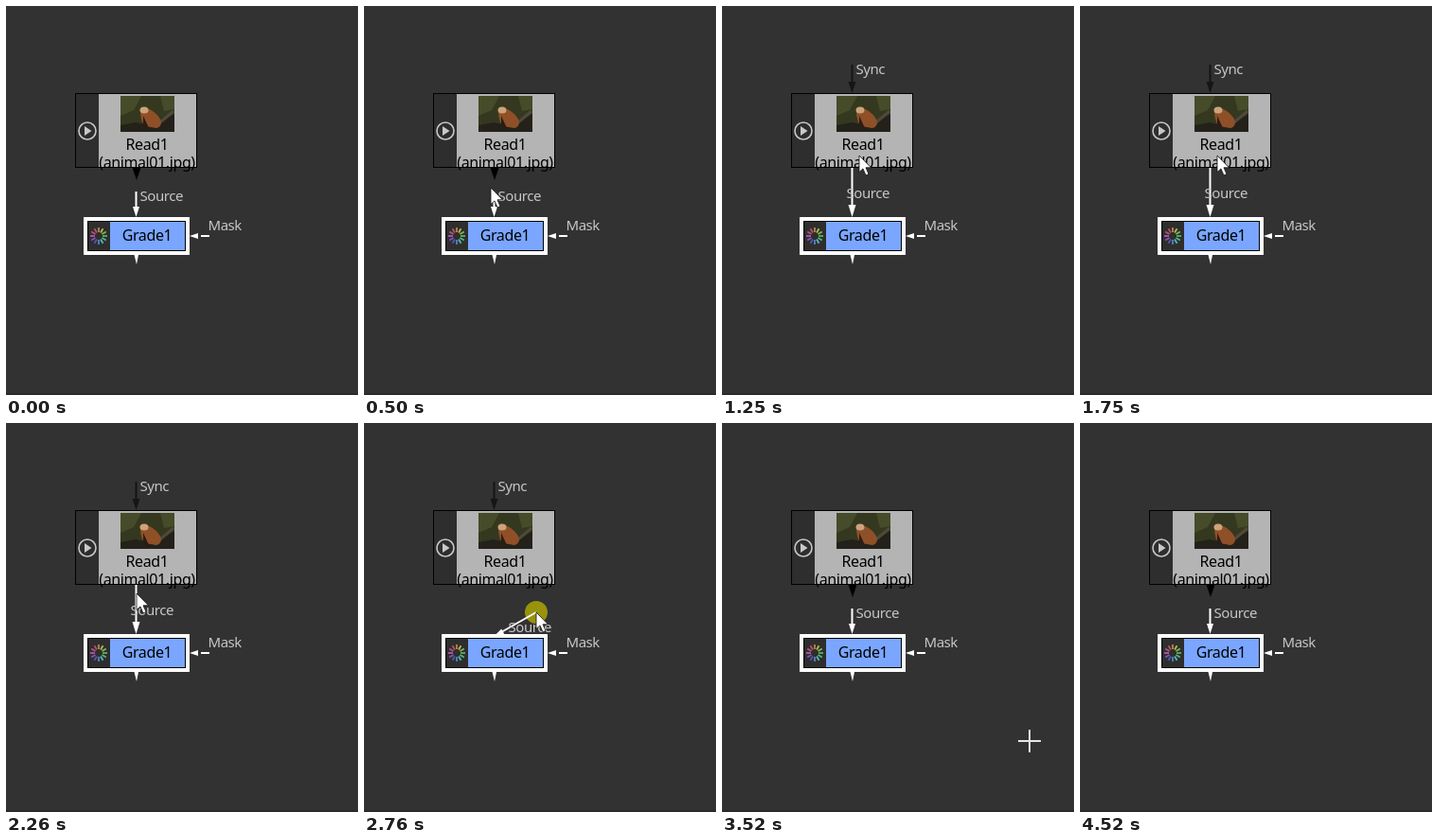
Animation of 372 by 411 pixels, one loop 4770 ms. Source, as an HTML page:

```html
<!DOCTYPE html>
<html lang="en">
<head>
<meta charset="utf-8">
<title>Node graph</title>
<style>
  html, body { margin: 0; width: 100%; height: 100%; overflow: hidden; background: #323232; }
  svg { display: block; width: 372px; height: 411px; font-family: "Noto Sans", "Open Sans", sans-serif; }
  .label { font-size: 15px; letter-spacing: -.45px; fill: #c6c6c6; }
  .title { font-size: 16px; letter-spacing: -.4px; fill: #000; }
  .wire { stroke: #fff; stroke-width: 2; }
  .white { fill: #fff; }

  .anim { animation: 4770ms step-end infinite; }
  #loose { animation-name: loose; }
  #output { animation-name: output; }
  #linked { animation-name: linked; }
  #sync { animation-name: sync; }
  #dragA { animation-name: dragA; }
  #dragB { animation-name: dragB; }
  #dragC { animation-name: dragC; }
  #arrow { animation-name: arrow; }
  #cross { animation-name: cross; }

  @keyframes loose { 0%, 63.1% { opacity: 1; } 20.96% { opacity: 0; } 100% { opacity: 1; } }
  @keyframes output { 0%, 63.1% { opacity: 1; } 26.21% { opacity: 0; } 100% { opacity: 1; } }
  @keyframes linked { 0%, 52.62%, 100% { opacity: 0; } 26.21% { opacity: 1; } }
  @keyframes sync { 0%, 63.1%, 100% { opacity: 0; } 26.21% { opacity: 1; } }
  @keyframes dragA { 0%, 26.21%, 100% { opacity: 0; } 20.96% { opacity: 1; } }
  @keyframes dragB { 0%, 57.86%, 100% { opacity: 0; } 52.62% { opacity: 1; } }
  @keyframes dragC { 0%, 63.1%, 100% { opacity: 0; } 57.86% { opacity: 1; } }
  @keyframes arrow {
    0% { opacity: 0; transform: translate(134px, 192px); }
    10.48% { opacity: 1; transform: translate(134px, 192px); }
    20.96% { opacity: 1; transform: translate(150px, 188px); }
    26.21% { opacity: 1; transform: translate(145px, 158px); }
    41.93% { opacity: 1; transform: translate(142px, 167px); }
    47.38% { opacity: 1; transform: translate(138px, 180px); }
    52.62% { opacity: 1; transform: translate(148px, 190px); }
    57.86% { opacity: 1; transform: translate(182px, 200px); }
    63.1%, 100% { opacity: 0; transform: translate(182px, 200px); }
  }
  @keyframes cross {
    0% { opacity: 0; transform: translate(245px, 233px); }
    63.1% { opacity: 1; transform: translate(245px, 233px); }
    68.55% { opacity: 1; transform: translate(273px, 267px); }
    73.79% { opacity: 1; transform: translate(325px, 336px); }
    94.76%, 100% { opacity: 0; transform: translate(325px, 336px); }
  }
</style>
</head>
<body>
<svg viewBox="0 0 372 411">
  <rect width="372" height="411" fill="#323232"/>
  <rect y="409" width="372" height="2" fill="#2b2929"/>

  <!-- Read node -->
  <g>
    <rect x="73.5" y="92.5" width="128" height="78" fill="#b4b4b4" stroke="#000"/>
    <rect x="74" y="93" width="24" height="77" fill="#2e2e2e"/>
    <circle cx="86" cy="132" r="9" fill="none" stroke="#c8c8c8" stroke-width="1.6"/>
    <path d="M83 127v10l7.5-5z" fill="#c8c8c8"/>
    <svg x="121" y="95" width="57" height="38" viewBox="0 0 57 38">
      <rect width="57" height="38" fill="#34381f"/>
      <path d="M0 0h22l-8 15-14 6zM42 0h15v14l-11 2z" fill="#464b29"/>
      <path d="M0 31l16-3 20 4 21-13v19H0z" fill="#23211a"/>
      <path d="M36 33l20-17" stroke="#4f493b" stroke-width="3"/>
      <path d="M21 16q7-5 13 0 7 5 9 11 0 6-5 7l-12-2q-5-5-5-16z" fill="#8f5028"/>
      <ellipse cx="25" cy="15" rx="4.5" ry="3.5" fill="#cda27a"/>
      <path d="M24 21l6 13h-6z" fill="#2a1d16"/>
    </svg>
    <text class="title" x="149" y="152" text-anchor="middle">Read1</text>
    <text class="title" x="149" y="171" text-anchor="middle">(animal01.jpg)</text>
  </g>

  <path id="output" class="anim" d="M133.5 171h9l-4.5 13z"/>

  <g id="sync" class="anim">
    <path d="M137.5 62v20" stroke="#151515" stroke-width="2"/>
    <path d="M133.5 80h8l-4 12z" fill="#151515"/>
    <text class="label" x="141.5" y="72">Sync</text>
  </g>

  <!-- Source input -->
  <g id="loose" class="anim">
    <path class="wire" d="M137.5 196v18"/>
    <path class="white" d="M134 212h7l-3.5 11z"/>
    <text class="label" x="141.5" y="206">Source</text>
  </g>
  <g id="linked" class="anim">
    <path class="wire" d="M137.5 171v42"/>
    <path class="white" d="M133.5 210h8l-4 13z"/>
    <text class="label" x="131.5" y="203">Source</text>
  </g>
  <g id="dragA" class="anim"></g>
  <g id="dragB" class="anim"></g>
  <g id="dragC" class="anim"></g>

  <!-- Grade node -->
  <g>
    <rect class="white" x="82" y="223" width="112" height="40"/>
    <rect x="86.5" y="227.5" width="103" height="31" fill="#7aa6ff" stroke="#000"/>
    <rect x="87" y="228" width="23" height="30" fill="#2e2e2e"/>
    <g id="wheel" transform="translate(98 243)"></g>
    <text class="title" x="149" y="248" text-anchor="middle">Grade1</text>
    <path class="white" d="M135.5 263h4.5l-2 10zM194 243l9-3v6z"/>
    <path class="wire" d="M206 243h9"/>
    <text class="label" x="213.5" y="237">Mask</text>
  </g>

  <path id="arrow" class="anim" d="M0 0v17.5l4-3.6 3 7 3-1.3-3-6.8h5.5z" fill="#fff" stroke="#111" stroke-width=".8"/>
  <path id="cross" class="anim" d="M-12 0h24M0-12v24" stroke="#e6e6e6" stroke-width="2"/>
</svg>
<script>
  const byId = id => document.getElementById(id);

  // Loose wire end held at (x, y), pointing at the top of the Grade node.
  function drawDrag(id, x, y) {
    const endX = 138, endY = 225;
    const turn = Math.atan2(endY - y, endX - x) * 180 / Math.PI;
    byId(id).innerHTML =
      `<circle cx="${x}" cy="${y}" r="12" fill="#99920c"/>
       <path class="wire" d="M${x} ${y}L${endX} ${endY}"/>
       <path class="white" d="M0 0l-10-3v6z" transform="translate(${endX} ${endY}) rotate(${turn})"/>
       <text class="label" x="${(x + endX) / 2 - 7.5}" y="${(y + endY) / 2 + 8.5}">Source</text>`;
  }
  drawDrag("dragA", 150, 188);
  drawDrag("dragB", 148, 190);
  drawDrag("dragC", 182, 200);

  byId("wheel").innerHTML = Array.from({ length: 12 }, (_, i) =>
    `<path d="M0-4V-9" stroke="hsl(${30 + i * 30} 40% 52%)" stroke-width="1.8" transform="rotate(${i * 30})"/>`
  ).join("");
</script>
</body>
</html>
```
